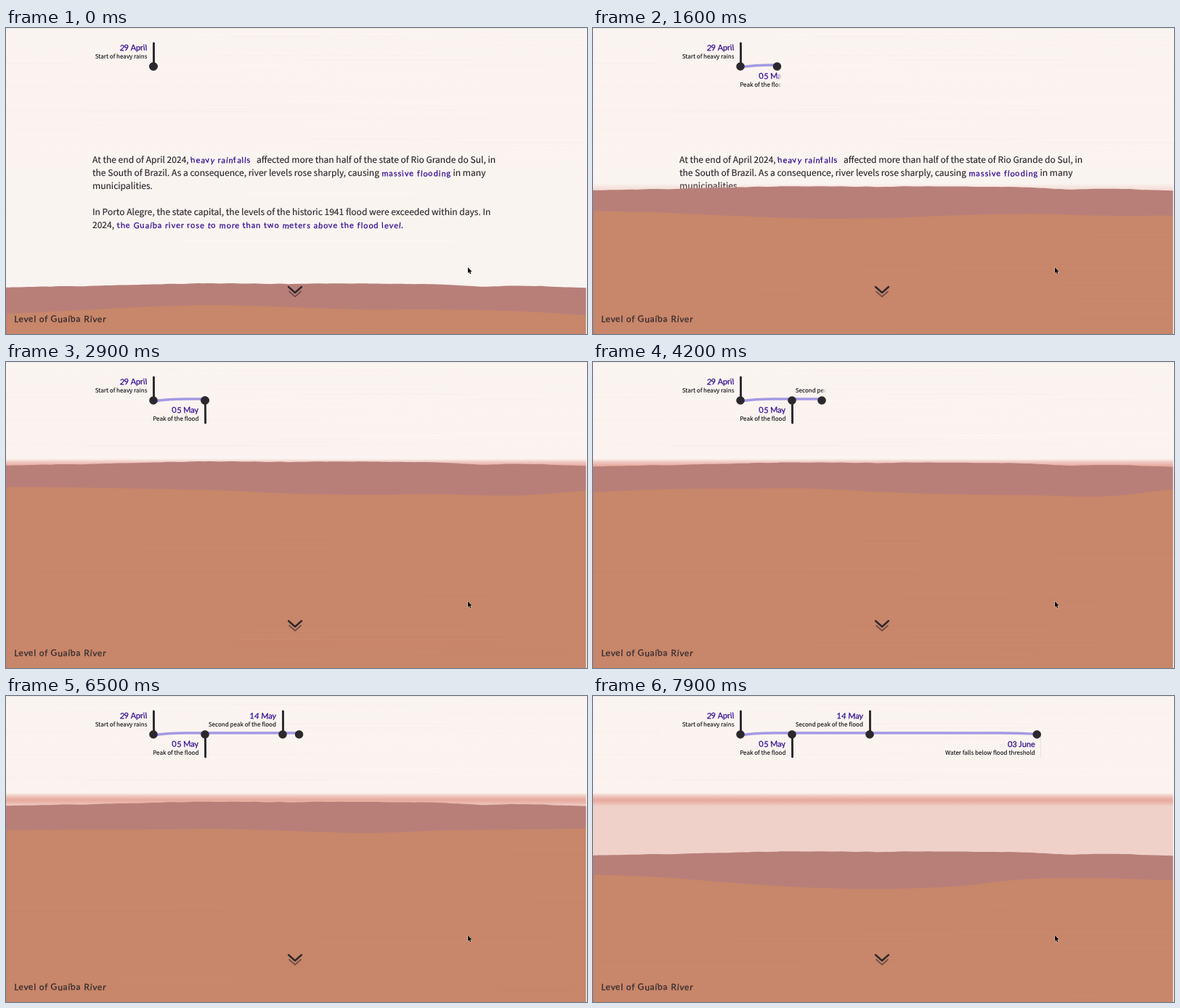
Write an HTML page that moves like this. It is 800x422 px and loops after 8 s.

```html
<!DOCTYPE html>
<html lang="en">
<head>
<meta charset="utf-8">
<title>River level timeline</title>
<style>
  html, body { margin: 0; width: 100%; height: 100%; overflow: hidden; background: #faf4f0; }
  svg { display: block; width: 100vw; height: 100vh; }
  text { white-space: pre; text-rendering: geometricPrecision; }
  .body, .note { font-family: "Noto Sans CJK JP", "Noto Sans CJK SC", "Noto Sans CJK KR", "Noto Sans CJK", "Open Sans", sans-serif; }
  .body { font-size: 12.06px; fill: #2a262c; stroke: #2a262c; stroke-width: .15px; }
  .note { font-size: 8.08px; fill: #0e0c10; stroke: #0e0c10; stroke-width: .1px; text-anchor: end; }
  .hand { font-family: Lato, sans-serif; font-size: 11px; letter-spacing: .95px; fill: #330a92; stroke: #330a92; stroke-width: .25px; }
  .date { letter-spacing: 0; text-anchor: end; }
  .level { font-size: 12px; letter-spacing: .75px; fill: #302a2e; stroke: #302a2e; }
  .ink { stroke: #2c292e; stroke-width: 2.6; stroke-linecap: round; fill: none; }
  .dot { fill: #2c292e; }
</style>
</head>
<body>
<svg id="stage" viewBox="0 0 800 422" preserveAspectRatio="none">
  <defs>
    <linearGradient id="paper" x1="0" y1="0" x2="0" y2="1">
      <stop offset="0" stop-color="#faf4f0"/>
      <stop offset=".3" stop-color="#fbf3ef"/>
      <stop offset=".5" stop-color="#faf4f0"/>
      <stop offset="1" stop-color="#f9f4f0"/>
    </linearGradient>
    <linearGradient id="stainFill" gradientUnits="userSpaceOnUse" x1="0" y1="0" x2="0" y2="22">
      <stop offset="0" stop-color="#efc3b8" stop-opacity="0"/>
      <stop offset=".22" stop-color="#ecbdb2" stop-opacity=".8"/>
      <stop offset=".45" stop-color="#e7aa9d"/>
      <stop offset=".62" stop-color="#eab6aa"/>
      <stop offset=".85" stop-color="#f0d1c9"/>
      <stop offset="1" stop-color="#f0d1c9"/>
    </linearGradient>
    <linearGradient id="edge" gradientUnits="userSpaceOnUse" x1="-1" y1="0" x2="6" y2="0">
      <stop offset="0" stop-color="#fff"/>
      <stop offset="1" stop-color="#000"/>
    </linearGradient>
    <mask id="reveal" maskUnits="userSpaceOnUse" x="0" y="0" width="800" height="120">
      <rect width="800" height="120" fill="url(#edge)"/>
    </mask>
  </defs>

  <rect width="800" height="422" fill="url(#paper)"/>
  <g id="grain"></g>
  <rect width="800" height="1" fill="#ece7e4"/>
  <g id="story"></g>

  <rect id="stain" width="800" height="422" fill="url(#stainFill)"/>
  <g id="water">
    <path id="back" fill="#b87f79"/>
    <path id="front" fill="#c8866a"/>
    <g id="ripples"></g>
    <rect y="9" width="1.3" height="420" fill="#b87f79" opacity=".6"/>
  </g>
  <rect x="798.7" width="1.3" height="422" fill="#fbf8f7"/>

  <g id="masked" mask="url(#reveal)">
    <path d="M203 54Q222 51 250 51H560Q590 51 617 53" fill="none" stroke="#a399e4" stroke-width="3.6"/>
  </g>
  <g id="open"></g>
  <circle id="tip" class="dot" cy="53" r="5.8"/>

  <g fill="none" stroke-linecap="round" stroke-linejoin="round">
    <path d="M390 363.5L398 370.5L406 363.5" stroke="#6f5049" stroke-width="1.8"/>
    <path d="M389 357L398 365L407 357" stroke="#2e292c" stroke-width="2.4"/>
  </g>
  <g id="label"></g>
  <path d="M636 330V338L637.8 336.5L639 339.3L640.4 338.7L639.2 336H641.6Z" fill="#0c0b0c" stroke="#fff" stroke-width=".7" paint-order="stroke"/>
</svg>

<script>
const LOOP = 8000, STEP = 100;
const NS = 'http://www.w3.org/2000/svg';
const $ = id => document.getElementById(id);

let seed = 7;
const rand = () => (seed = seed * 16807 % 2147483647) / 2147483647;

function add(parent, tag, attrs, content) {
  const el = document.createElementNS(NS, tag);
  for (const k in attrs) el.setAttribute(k, attrs[k]);
  if (content) el.textContent = content;
  parent.append(el);
  return el;
}

const print = (parent, x, y, str, cls = 'body') => add(parent, 'text', { x, y, class: cls }, str);

// Handwriting: every letter leans a little differently.
function write(parent, x, y, str, cls = '') {
  const rotate = [...str].map(() => (rand() * 14 - 7).toFixed(1)).join(' ');
  add(parent, 'text', { x, y, rotate, class: 'hand ' + cls }, str);
}

function streaks(parent, count, top, height, colors, opacity) {
  for (let i = 0; i < count; i++) {
    const width = 120 + rand() * 600;
    add(parent, 'rect', {
      x: rand() * 900 - 200, y: top + rand() * height, width, height: .6 + rand() * 1.6, rx: 1,
      fill: colors[i % colors.length], opacity: opacity * (.4 + rand() * .6)
    });
  }
}

streaks($('grain'), 50, 2, 170, ['#f6e3dc', '#fdfaf8'], .3);
streaks($('grain'), 30, 170, 250, ['#f5ebe5', '#fdfaf8'], .25);
streaks($('ripples'), 70, 60, 300, ['#cf9072', '#c07e63'], .2);

const story = $('story');
print(story, 119, 186, 'At the end of April 2024,');
write(story, 254.5, 186, 'heavy rainfalls');
print(story, 345, 186, 'affected more than half of the state of Rio Grande do Sul, in');
print(story, 119, 204, 'the South of Brazil. As a consequence, river levels rose sharply, causing');
write(story, 517.5, 204.5, 'massive flooding');
print(story, 615.5, 204, 'in many');
print(story, 119, 222, 'municipalities.');
print(story, 119, 258, 'In Porto Alegre, the state capital, the levels of the historic 1941 flood were exceeded within days. In');
print(story, 119, 276, '2024,');
write(story, 153, 276, 'the Guaíba river rose to more than two meters above the flood level.');
write($('label'), 11, 405.5, 'Level of Guaíba River', 'level');

const events = [
  { x: 203, end: 194.5, date: '29 April', note: 'Start of heavy rains' },
  { x: 274, end: 265.5, date: '05 May', note: 'Peak of the flood', below: true },
  { x: 381, end: 372, date: '14 May', note: 'Second peak of the flood' },
  { x: 617, end: 608.8, date: '03 June', note: 'Water falls below flood threshold', below: true }
];

events.forEach((e, i) => {
  const box = i ? $('masked') : $('open');
  const shift = e.below ? 39.3 : 0;
  const stem = e.below ? `M${e.x + .3} 54L${e.x + .6} 84` : `M${e.x + .4} 21L${e.x + .6} 52`;
  write(box, e.end, 31 + shift, e.date, 'date');
  print(box, e.end, 41.6 + shift, e.note, 'note');
  add(box, 'path', { d: stem, class: 'ink' });
  e.mark = add($('open'), 'g', {});
  add(e.mark, 'path', { d: stem, class: 'ink' });
  add(e.mark, 'circle', { cx: e.x, cy: 53, r: 5.8, class: 'dot' });
});

// Smooth curve through points [x, y], closed along the bottom.
function curve(pts) {
  let d = `M${pts[0]}`;
  for (let i = 0; i < pts.length - 1; i++) {
    const a = pts[i - 1] || pts[i], b = pts[i], c = pts[i + 1], e = pts[i + 2] || c;
    d += `C${b[0] + (c[0] - a[0]) / 6} ${b[1] + (c[1] - a[1]) / 6} ${c[0] - (e[0] - b[0]) / 6} ${c[1] - (e[1] - b[1]) / 6} ${c}`;
  }
  return d + 'V430H0Z';
}

const crest = [[0, 5.5], [50, 4.5], [120, 3.6], [190, 1.6], [260, 0], [330, .2], [400, .8], [440, 0],
  [550, .5], [600, 1.5], [655, 4.5], [690, 3.5], [740, 4], [800, 6]];

// Add a fine uneven edge to the crest.
function roughen(pts) {
  const out = [];
  for (let i = 0; i < pts.length - 1; i++) {
    const [x0, y0] = pts[i], [x1, y1] = pts[i + 1];
    const n = Math.round((x1 - x0) / 12);
    for (let j = 0; j < n; j++) {
      out.push([x0 + (x1 - x0) * j / n, y0 + (y1 - y0) * j / n + rand() * .6 - .3]);
    }
  }
  return [...out, pts[pts.length - 1]];
}
$('back').setAttribute('d', curve(roughen(crest)));

// Front swell: time in seconds, then depth below the waterline every 100 px.
const swell = [
  [0, [42, 37, 32, 30, 33, 36, 36, 38, 44]],
  [1.2, [37, 38, 43, 46, 41, 33, 31, 34, 39]],
  [2, [31, 35, 39, 43, 47, 47, 45, 47, 42]],
  [4.2, [41, 37, 36, 36, 41, 44, 45, 47, 37]],
  [5.6, [35, 41, 46, 44, 41, 38, 36, 46, 49]],
  [7.1, [42, 37, 33, 33, 40, 47, 42, 33, 29]],
  [7.9, [32, 36, 44, 50, 52, 48, 38, 37, 40]]
];

function swellAt(s) {
  let i = 0;
  while (i < swell.length - 2 && s > swell[i + 1][0]) i++;
  const [t0, a] = swell[i], [t1, b] = swell[i + 1];
  const u = Math.min(1, (s - t0) / (t1 - t0));
  return a.map((y, k) => [k * 100, y + (b[k] - y) * u]);
}

const clamp = v => Math.max(0, Math.min(1, v));
const ease = (s, start, length) => (1 - Math.cos(Math.PI * clamp((s - start) / length))) / 2;
const show = (el, on) => el.setAttribute('visibility', on ? 'visible' : 'hidden');

function draw(ms) {
  const s = ms / 1000;
  const x = 203 + 71 * ease(s, .47, 1.77) + 107 * ease(s, 3.35, 2) + 236 * ease(s, 6.1, 2);
  const highest = 352.2 - 215 * ease(s, .5, 1.9);
  const level = highest + 3.5 * ease(s, 3.35, 2) + 77 * ease(s, 6.17, 2);

  $('water').setAttribute('transform', `translate(0 ${level})`);
  $('front').setAttribute('d', curve(swellAt(s)));
  $('stain').setAttribute('transform', `translate(0 ${highest - 4})`);
  $('stain').setAttribute('opacity', clamp((s - 1.4) / .6));
  show(story, s < 2);

  $('edge').setAttribute('gradientTransform', `translate(${x} 0)`);
  $('tip').setAttribute('cx', x);
  show($('masked'), x > events[0].x);
  for (const e of events) show(e.mark, x > e.x - .5);
}

const began = performance.now();
function tick() {
  const t = (performance.now() - began) % LOOP;
  draw(Math.floor(t / STEP) * STEP);
  requestAnimationFrame(tick);
}
draw(0);
requestAnimationFrame(tick);
</script>
</body>
</html>
```
